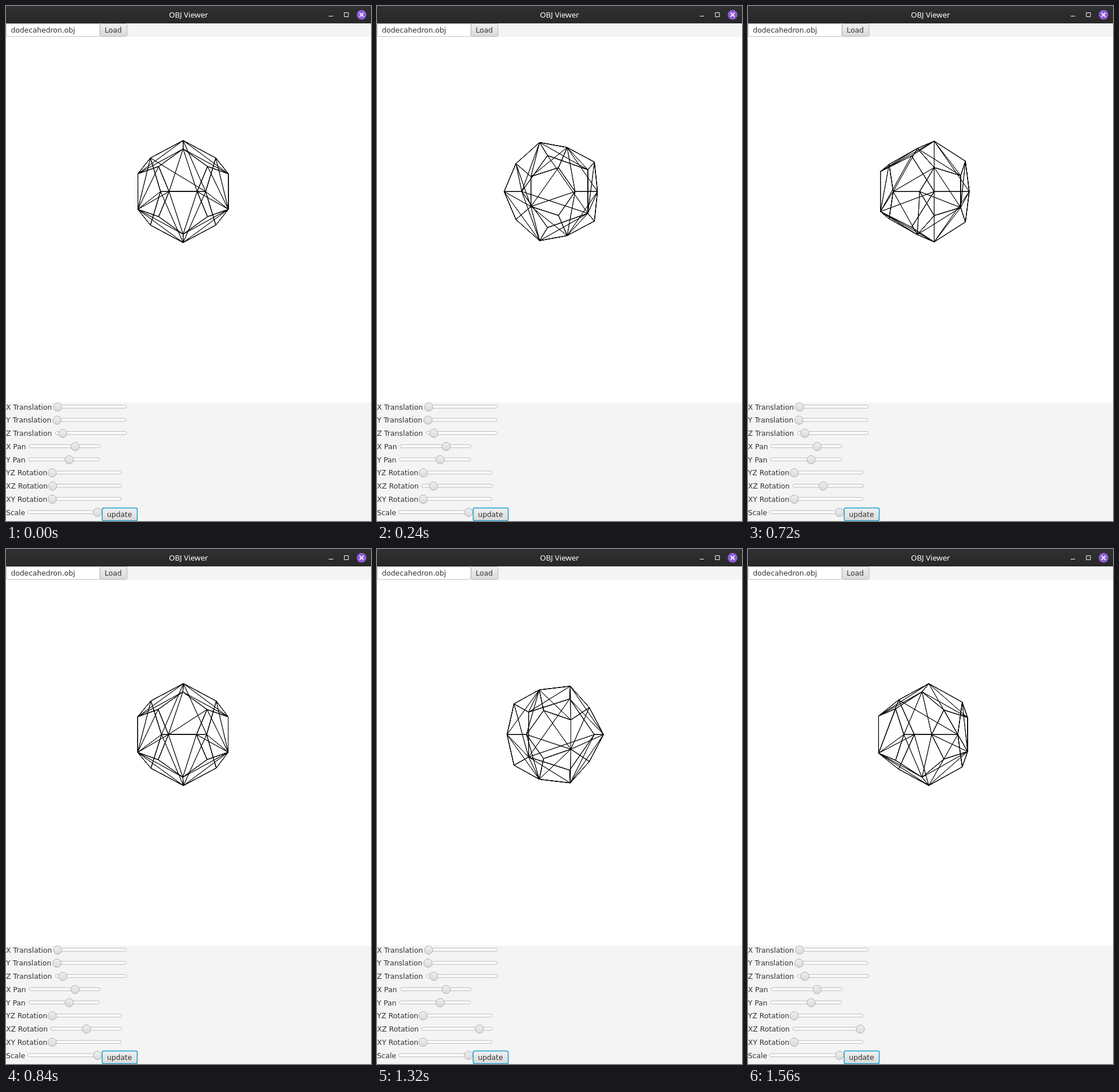
Write an HTML page that moves like this. It is 630 px wide and 889 px high and loops after 1680 ms.

```html
<!DOCTYPE html>
<html lang="en">
<head>
<meta charset="utf-8">
<title>OBJ Viewer</title>
<style>
  html, body { margin: 0; width: 100%; height: 100%; overflow: hidden; background: #fff; }
  svg { display: block; }
  text { font: 12.29px "DejaVu Sans", sans-serif; fill: #333; }
  .title { font: 500 13.2px "Noto Sans", sans-serif; fill: #fff; text-anchor: middle; }
  .icon { fill: none; stroke: #fff; }
  .button { fill: url(#face); stroke: #b9b9b9; }
  .track { fill: #fbfbfb; stroke: #bcbcbc; }
  .thumb { fill: url(#face); stroke: #aeaeae; }
  #mesh { fill: none; stroke: #000; stroke-width: .95; stroke-linejoin: round; }
</style>
</head>
<body>
<svg width="630" height="889" viewBox="0 0 630 889">
  <defs>
    <linearGradient id="face" x2="0" y2="1">
      <stop stop-color="#f0f0f0"/><stop offset="1" stop-color="#d9d9d9"/>
    </linearGradient>
    <linearGradient id="bar" x2="0" y2="1">
      <stop stop-color="#303030"/><stop offset="1" stop-color="#282828"/>
    </linearGradient>
  </defs>
  <rect width="630" height="889" fill="#fff"/>

  <rect width="630" height="30" fill="url(#bar)"/>
  <text class="title" x="315" y="20">OBJ Viewer</text>
  <path class="icon" d="M557 17.5h7.5M584 11.5h7v7h-7z"/>
  <circle cx="613.7" cy="15.2" r="8.4" fill="#8e5cd9"/>
  <path class="icon" d="M610.2 11.7l7 7m0-7l-7 7" stroke-width="1.7"/>

  <rect y="30" width="630" height="23" fill="#f4f4f4"/>
  <rect x=".5" y="30.5" width="161.5" height="22" rx="2" fill="#fff" stroke="#c3c3c3"/>
  <text x="8.5" y="46.3">dodecahedron.obj</text>
  <rect class="button" x="162.5" y="30.5" width="46.5" height="22" rx="2.5"/>
  <text x="170.3" y="46.3">Load</text>

  <path id="mesh"/>
  <use href="#mesh"/>

  <rect y="684.5" width="630" height="204.5" fill="#f4f4f4"/>
  <g id="sliders"></g>
  <rect x="166" y="866.5" width="60.5" height="22" rx="2.5" fill="url(#face)" stroke="#1a9fd0" stroke-width="1.5"/>
  <text x="174.2" y="882.3">update</text>
</svg>
<script>
const STEP = 120;
// XZ rotation in degrees at each step of the drag
const ANGLES = [0, 26, 52.6, 77, 101.7, 126, 151, 179, 207, 235.5, 266, 296.5, 323, 348.8];

const P = 0.934172, Q = 0.356822, R = 0.57735;
const VERTICES = [
  [-R, -R, R], [P, Q, 0], [P, -Q, 0], [-P, Q, 0], [-P, -Q, 0],
  [0, P, Q], [0, P, -Q], [Q, 0, -P], [-Q, 0, -P], [0, -P, -Q],
  [0, -P, Q], [Q, 0, P], [-Q, 0, P], [R, R, -R], [R, R, R],
  [-R, R, -R], [-R, R, R], [R, -R, -R], [R, -R, R], [-R, -R, -R],
];
// Each pentagon is a triangle fan around its first vertex (numbered from 1)
const FANS = [
  [2, 3, 19, 12, 15], [2, 3, 18, 8, 14], [2, 14, 7, 6, 15],
  [4, 5, 20, 9, 16], [4, 5, 1, 13, 17], [4, 17, 6, 7, 16],
  [3, 18, 10, 11, 19], [5, 20, 10, 11, 1], [8, 18, 10, 20, 9],
  [7, 14, 8, 9, 16], [6, 15, 12, 13, 17], [11, 19, 12, 13, 1],
];

// label, left end of the track, thumb position
const SLIDERS = [
  ["X Translation", 85.3, 89], ["Y Translation", 84.4, 88], ["Z Translation", 85.3, 98],
  ["X Pan", 39.9, 119.3], ["Y Pan", 38.9, 109],
  ["YZ Rotation", 75.9, 79.7], ["XZ Rotation", 76.9, 80.5], ["XY Rotation", 75.9, 79.7],
  ["Scale", 37.2, 158],
];

const mesh = document.getElementById("mesh");
const panel = document.getElementById("sliders");

function add(tag, attrs, text = "") {
  const node = document.createElementNS("http://www.w3.org/2000/svg", tag);
  for (const name in attrs) node.setAttribute(name, attrs[name]);
  node.textContent = text;
  return panel.appendChild(node);
}

const thumbs = SLIDERS.map(([label, left, thumb], i) => {
  const y = 692 + 22.75 * i;
  add("text", { x: 0, y: y + 4.6 }, label);
  add("rect", { class: "track", x: left, y: y - 3, width: 122.7, height: 5.3, rx: 2.6 });
  return add("circle", { class: "thumb", cx: thumb, cy: y + 0.2, r: 7.2 });
});

function project([x, y, z], angle) {
  const c = Math.cos(angle), s = Math.sin(angle);
  const depth = 4 + z * c - x * s;
  return [305.7 + 334.5 * (x * c + z * s) / depth, 320.3 + 343.5 * y / depth]
    .map(v => v.toFixed(2)).join(" ");
}

function draw(degrees) {
  const points = VERTICES.map(v => project(v, degrees * Math.PI / 180));
  mesh.setAttribute("d", FANS.map(([hub, ...rim]) => {
    const spokes = rim.slice(1, -1).map(i => `M${points[hub - 1]}L${points[i - 1]}`);
    return "M" + [hub, ...rim].map(i => points[i - 1]).join("L") + "Z" + spokes.join("");
  }).join(""));
  thumbs[6].setAttribute("cx", 80.5 + 117 * degrees / 360);
}

const start = performance.now();
function tick() {
  const step = Math.floor((performance.now() - start) / STEP) % ANGLES.length;
  draw(ANGLES[step]);
  requestAnimationFrame(tick);
}
tick();
</script>
</body>
</html>
```
